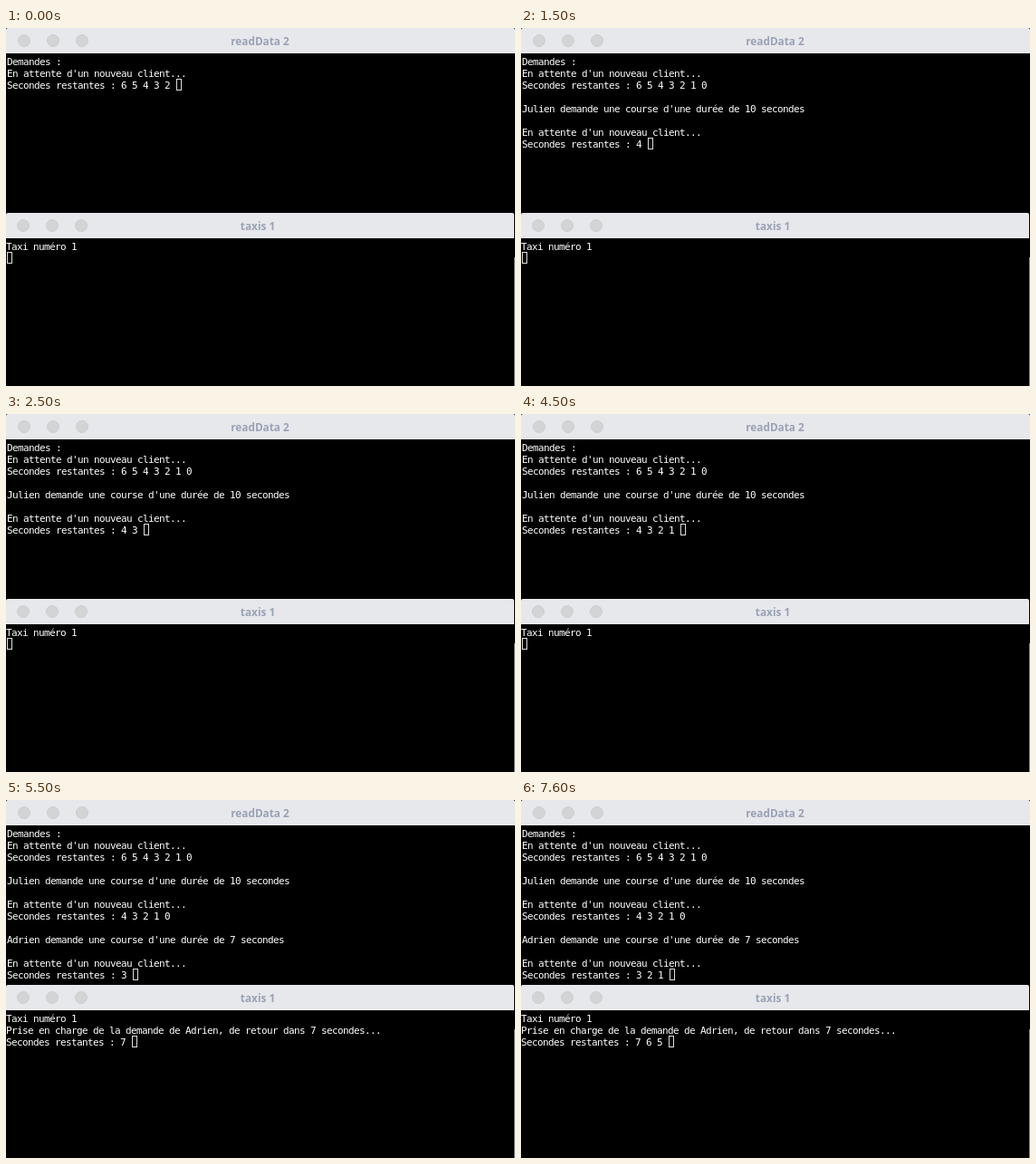
These frames come from a looping animation (562x395 px, 8 s). An HTML page:

```html
<!DOCTYPE html>
<html lang="fr">
<head>
<meta charset="utf-8">
<style>
  html, body { margin: 0; width: 100%; height: 100%; overflow: hidden; background: #000; }
  .window { position: absolute; left: 0; }
  #requests { top: 0; width: 562px; --x: 2px; --dot: 20px; --title: 280.5px; }
  #taxi { top: 204px; width: 561px; --x: 1px; --dot: 19px; --title: 278px; }
  header { position: relative; height: 28px; border-radius: 2px 2px 0 0; background: #e7e8eb; }
  header i {
    position: absolute; top: 7px; left: calc(var(--dot) - 7px + 32px * var(--n));
    width: 14px; height: 14px; box-sizing: border-box;
    border: 1px solid #cdcecf; border-radius: 50%; background: #d3d4d4;
  }
  h1 {
    position: absolute; left: var(--title); top: 0; margin: 0; transform: translateX(-50%);
    font: bold 11.8px/28px "Noto Sans", "Open Sans", sans-serif; color: #9aa2b7; white-space: pre;
  }
  pre {
    position: absolute; left: calc(var(--x) - 1px); top: 31px; margin: 0; color: #fff;
    font: 11px/13px "DejaVu Sans Mono", monospace; letter-spacing: calc(6px - 1ch);
    font-variant-ligatures: none;
  }
  .cursor {
    position: absolute; width: 6px; height: 13px; box-sizing: border-box; border: 1px solid #dedede;
  }
  #edge { position: absolute; left: 561px; top: 253px; width: 1px; height: 142px; background: #8c8d90; }
</style>
</head>
<body>
<section class="window" id="requests">
  <header><i style="--n:0"></i><i style="--n:1"></i><i style="--n:2"></i><h1>readData 2</h1></header>
  <pre></pre><div class="cursor"></div>
</section>
<section class="window" id="taxi">
  <header><i style="--n:0"></i><i style="--n:1"></i><i style="--n:2"></i><h1>taxis 1</h1></header>
  <pre></pre><div class="cursor"></div>
</section>
<div id="edge"></div>
<script>
const LOOP = 8000, CELL_W = 6, CELL_H = 13, TEXT_TOP = 30;
const steps = [500, 1500, 2500, 3500, 4500, 5500, 6600, 7600];
const left = "Secondes restantes : ";
const waiting = "En attente d'un nouveau client...\n" + left;
const ride = (name, seconds) =>
  `0 \n\n${name} demande une course d'une durée de ${seconds} secondes\n\n${waiting}`;

// Text added to each terminal at every step, starting with what is already there
const output = {
  requests: [`Demandes :\n${waiting}6 5 4 3 2 `, "1 ", ride("Julien", 10) + "4 ",
    "3 ", "2 ", "1 ", ride("Adrien", 7) + "3 ", "2 ", "1 "],
  taxi: ["Taxi numéro 1\n", "", "", "", "", "",
    `Prise en charge de la demande de Adrien, de retour dans 7 secondes...\n${left}7 `, "6 ", "5 "]
};

function show(id, step) {
  const win = document.getElementById(id);
  const text = output[id].slice(0, step + 1).join("");
  const lines = text.split("\n");
  win.querySelector("pre").textContent = text;
  const cursor = win.querySelector(".cursor").style;
  cursor.left = `calc(var(--x) + ${lines.at(-1).length * CELL_W}px)`;
  cursor.top = TEXT_TOP + (lines.length - 1) * CELL_H + "px";
}

let shown = -1;
function draw() {
  const t = performance.now() % LOOP;
  const step = steps.filter(at => t >= at).length;
  if (step !== shown) {
    shown = step;
    Object.keys(output).forEach(id => show(id, step));
  }
  requestAnimationFrame(draw);
}
draw();
</script>
</body>
</html>
```
